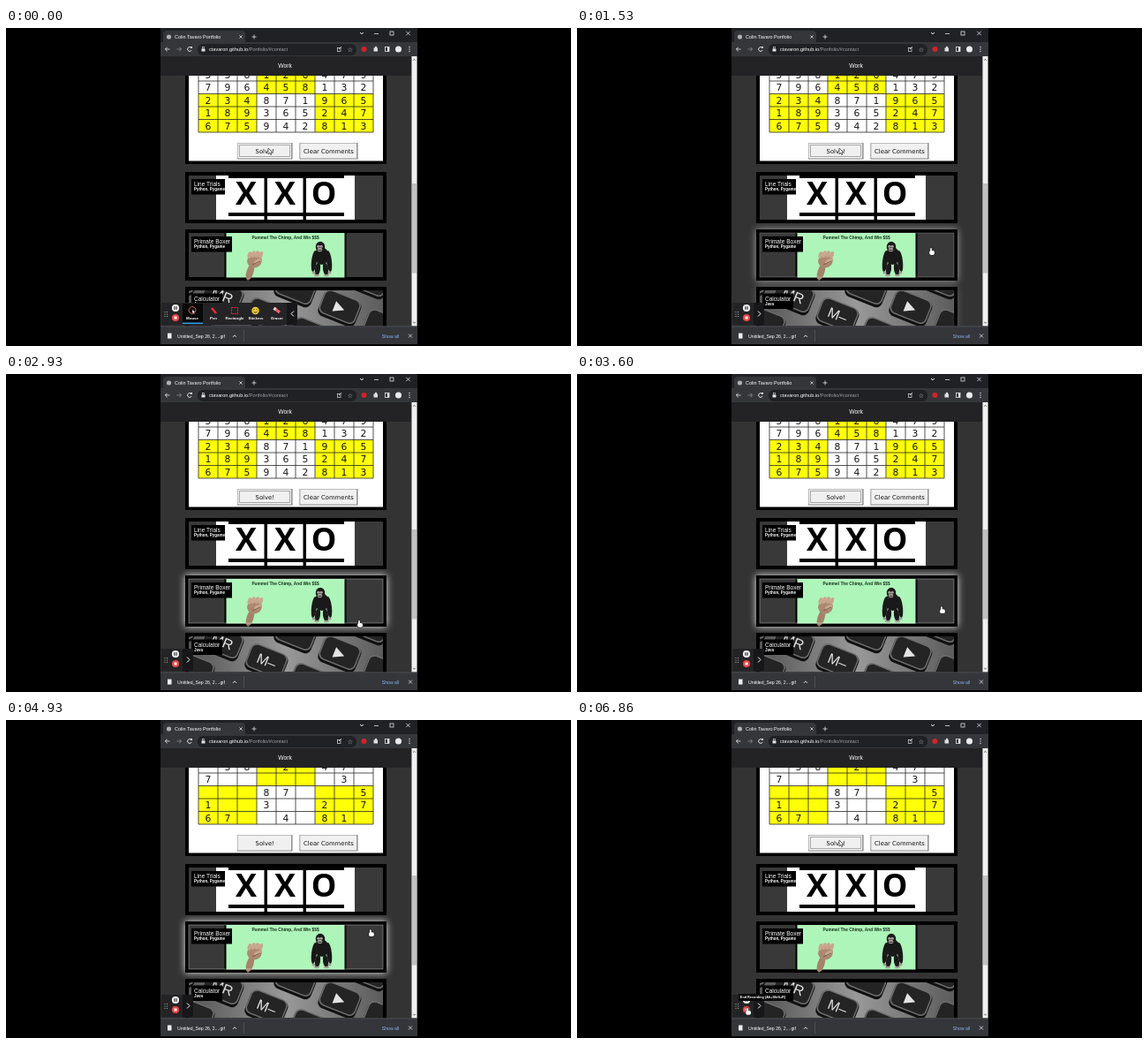
Animation, 640 px wide and 360 px high, one loop 7060 ms. Source, as an HTML page with a canvas:

```html
<!DOCTYPE html>
<html lang="en">
<head>
<meta charset="utf-8">
<style>
html, body { margin: 0; width: 100%; height: 100%; overflow: hidden; background: #000; }
canvas { display: block; width: 640px; height: 360px; }
</style>
</head>
<body>
<canvas id="stage" width="640" height="360"></canvas>
<script>
const ctx = document.getElementById('stage').getContext('2d');
const LOOP = 7060, TICK = 1000 / 15;
const FOLD = 1260, RESTART = 4900, PRESS = 6500;
const ARIAL = '"Liberation Sans", Arial, sans-serif';
const WIDE = '"DejaVu Sans", sans-serif';

// Stops of the pointer; motion between them is eased.
const STOPS = [
  { t: 0, x: 446, y: 366 }, { t: 860, x: 333, y: 321 }, { t: FOLD, x: 325, y: 321 },
  { t: 1700, x: 437, y: 215 }, { t: 2200, x: 370, y: 123 }, { t: 2930, x: 400, y: 279 },
  { t: 4130, x: 422, y: 252 }, { t: 4660, x: 421, y: 249 }, { t: 5860, x: 359, y: 160 },
  { t: 6800, x: 193, y: 326 }
];
const SOLVED = ['538126479', '796458132', '234871965', '189365247', '675942813'];
const GIVEN = [' 38 2 47 ', '7      3 ', '   87   5', '1  3  2 7', '67  4 81 '];

const cardAt = (y, h) => ({ x: 203, y, w: 228, h });
const CARDS = [cardAt(40, 114), ...[0, 1, 2].map((i) => cardAt(163 + i * 65, 58))];

const progress = (t, from, to) => {
  const k = Math.max(0, Math.min(1, (t - from) / (to - from)));
  return k * k * (3 - 2 * k);
};
const mix = (a, b, k) => a + (b - a) * k;

function pointerAt(t) {
  const next = Math.max(1, STOPS.findIndex((s) => s.t > t));
  if (t >= STOPS.at(-1).t) return STOPS.at(-1);
  const a = STOPS[next - 1], b = STOPS[next], k = progress(t, a.t, b.t);
  return { x: mix(a.x, b.x, k), y: mix(a.y, b.y, k) };
}

function rect(x, y, w, h, color) {
  ctx.fillStyle = color;
  ctx.fillRect(x, y, w, h);
}

function round(x, y, w, h, r, color) {
  ctx.fillStyle = color;
  ctx.beginPath();
  ctx.roundRect(x, y, w, h, r);
  ctx.fill();
}

function frame(x, y, w, h, color, width = 1) {
  ctx.strokeStyle = color;
  ctx.lineWidth = width;
  ctx.strokeRect(x, y, w, h);
}

function oval(x, y, rx, ry, color, tilt = 0) {
  ctx.fillStyle = color;
  ctx.beginPath();
  ctx.ellipse(x, y, rx, ry, tilt, 0, 7);
  ctx.fill();
}

const dot = (x, y, r, color) => oval(x, y, r, r, color);

function ring(x, y, r, color, end = 7) {
  ctx.strokeStyle = color;
  ctx.lineWidth = 1;
  ctx.beginPath();
  ctx.arc(x, y, r, .4, end);
  ctx.stroke();
}

function line(x1, y1, x2, y2, color, width = .8) {
  ctx.strokeStyle = color;
  ctx.lineWidth = width;
  ctx.beginPath();
  ctx.moveTo(x1, y1);
  ctx.lineTo(x2, y2);
  ctx.stroke();
}

function text(str, x, y, size, { color = '#fff', align = 'left', family = ARIAL, weight = '' } = {}) {
  ctx.font = `${weight} ${size}px ${family}`;
  ctx.fillStyle = color;
  ctx.textAlign = align;
  ctx.fillText(str, x, y);
}

function within(x, y, w, h, draw) {
  ctx.save();
  ctx.beginPath();
  ctx.rect(x, y, w, h);
  ctx.clip();
  draw();
  ctx.restore();
}

function placed(x, y, angle, scale, draw) {
  ctx.save();
  ctx.translate(x, y);
  ctx.rotate(angle);
  ctx.scale(scale, scale);
  draw();
  ctx.restore();
}

function cross(x, y, r, color = '#e0e2e5') {
  line(x - r, y - r, x + r, y + r, color);
  line(x - r, y + r, x + r, y - r, color);
}

// A corner whose tip points right at angle 0.
function chevron(x, y, r, angle, color = '#e0e2e5') {
  placed(x, y, angle, 1, () => {
    line(-r / 2, -r, r / 2, 0, color, 1);
    line(-r / 2, r, r / 2, 0, color, 1);
  });
}

function arrow(x, y, scale) {
  placed(x, y, 0, scale, () => {
    const shape = new Path2D('M0 0V8L2 6.3L3.2 9L4.6 8.4L3.4 5.7H5.8Z');
    ctx.fillStyle = '#fff';
    ctx.fill(shape);
    ctx.strokeStyle = '#111';
    ctx.lineWidth = .7;
    ctx.stroke(shape);
  });
}

function hand(x, y) {
  for (const [grow, color] of [[.6, '#222'], [0, '#fff']]) {
    round(x - .8 - grow, y - grow, 1.7 + 2 * grow, 6 + 2 * grow, 1, color);
    round(x - 1.8 - grow, y + 3 - grow, 5.8 + 2 * grow, 4.8 + 2 * grow, 1.8, color);
  }
}

function browserTop() {
  const ink = '#dfe1e5';
  rect(175, 0, 291, 17, '#202124');
  round(178, 3, 93, 15, [4, 4, 0, 0], '#35363a');
  dot(184.5, 10, 2.6, '#aeb1b5');
  text('Colin Tavaro Portfolio', 191, 12, 5.5);
  cross(266, 10, 1.6);
  line(278.5, 10, 283.5, 10, ink);
  line(281, 7.5, 281, 12.5, ink);
  chevron(403, 6, 2, Math.PI / 2);
  line(417, 6.5, 422, 6.5, ink);
  frame(435, 4, 4, 4, ink, .8);
  cross(455.5, 6, 2.2);

  rect(175, 16, 291, 16, '#35363a');
  round(217, 18, 180, 13, 6, '#202124');
  [[183, Math.PI, ink], [196, 0, '#888b90']].forEach(([x, angle, color]) => {
    chevron(x + Math.cos(angle) * 1.5, 24, 2.2, angle, color);
    line(x - 2.5, 24, x + 2.5, 24, color);
  });
  ring(208, 24, 2.4, ink, 5.5);
  rect(209, 21, 2, 2, ink);
  rect(221.5, 23.5, 4, 3, ink);
  frame(222.5, 21.5, 2, 2, ink, .6);
  const host = 'ctavaron.github.io';
  text(host, 230, 26, 5.6);
  const hostWidth = ctx.measureText(host).width;
  text('/Portfolio/#contact', 230 + hostWidth, 26, 5.6, { color: '#9aa0a6' });
  frame(375.5, 22.5, 3.5, 4, ink, .7);
  line(377, 24, 380, 21, ink);
  text('☆', 390, 26.7, 7, { color: ink, align: 'center', family: WIDE });
  dot(405.5, 24, 3, '#d3222a');
  rect(416.5, 22.5, 4.5, 4, ink);
  dot(419, 22, 1.2, ink);
  frame(429.5, 21.5, 4.5, 5, ink, .8);
  rect(432, 21.5, 2, 5, ink);
  dot(444.5, 24, 3.5, '#ececec');
  for (let i = -1; i < 2; i++) dot(457, 24 + i * 2.5, .7, ink);

  rect(175, 32, 284, 22, '#232325');
  text('Work', 316, 45.3, 6.8, { align: 'center' });
}

function downloads() {
  rect(175, 338, 291, 20, '#35363a');
  rect(175, 337.5, 291, .8, '#505258');
  rect(183, 345.5, 4.5, 6, '#eceef0');
  text('Untitled_Sep 26, 2....gif', 194, 350.8, 5.2);
  chevron(259, 348.8, 2, -Math.PI / 2);
  rect(269, 342, .8, 13, '#55575c');
  text('Show all', 435.5, 350.5, 5.1, { color: '#8ab4f8', align: 'center' });
  cross(458, 348.5, 2);
}

function scrollbar() {
  rect(459.5, 32, 6, 305.5, '#f1f1f1');
  rect(460, 176, 5, 101.5, '#c1c1c1');
  chevron(462.5, 36, 1.3, -Math.PI / 2, '#555');
  chevron(462.5, 333.5, 1.3, Math.PI / 2, '#555');
}

function cardFrame({ x, y, w, h }, glow) {
  ctx.save();
  ctx.shadowColor = `rgba(255,255,255,${glow * .9})`;
  ctx.shadowBlur = 8;
  rect(x, y, w, h, '#000');
  ctx.restore();
  rect(x + 4, y + 4, w - 8, h - 8, '#393939');
}

function label(y, w, title, tech) {
  rect(210, y, w, 17.5, '#000');
  text(title, 213, y + 8.2, 6.5);
  text(tech, 213, y + 13.2, 4.5, { weight: 'bold' });
}

function button(x, w, caption, focus) {
  rect(x, 130, w, 18.5, '#777');
  rect(x, 130, w - 1, 17.5, '#bbb');
  rect(x + 1, 131, w - 2.5, 16.5, '#f0f0f0');
  if (focus) {
    ctx.setLineDash(focus === 'dotted' ? [1, 1] : []);
    frame(x + 2.5, 132.5, w - 5.5, 13, focus === 'dotted' ? '#444' : '#999', .8);
    ctx.setLineDash([]);
  }
  text(caption, x + w / 2, 141.6, 6.8, { color: '#111', align: 'center', family: WIDE });
}

function sudoku(t) {
  const solved = t < RESTART, cell = 22, row = 14.5, left = 218, top = 45.5;
  rect(207, 54, 220, 96.5, '#fff');
  (solved ? SOLVED : GIVEN).forEach((digits, r) => {
    for (let c = 0; c < 9; c++) {
      const x = left + c * cell, y = top + r * row, middle = c > 2 && c < 6;
      if (middle === r < 2) rect(x, y, cell, row, '#ffff08');
      text(digits[c], x + 11, y + 11, 10.8, { color: '#151515', align: 'center', family: WIDE });
    }
  });
  for (let c = 0; c < 10; c++) line(left + c * cell, 54, left + c * cell, 118, '#282828');
  for (let r = 1; r < 6; r++) line(left, top + r * row, left + 9 * cell, top + r * row, '#282828');
  button(262, 62.5, 'Solve!', t > PRESS || t < 200 ? 'dotted' : solved && 'solid');
  button(332.5, 66, 'Clear Comments');
  const away = solved ? progress(t, 2000, 2600) : 1 - progress(t, RESTART, 5400);
  within(207, 54, 220, 96, () => arrow(297 + away * 25, 136 + away * 24, .85));
}

function noughts() {
  rect(238, 167, 157, 50, '#fff');
  rect(252, 167, 131, 3, '#000');
  rect(252, 209, 131, 4, '#000');
  for (let i = 0; i < 3; i++) {
    if (i) rect(248.5 + i * 44, 167, 3.5, 50, '#000');
    text('XXO'[i], 272 + i * 44, 200.3, 36,
      { color: '#000', align: 'center', family: '"Open Sans", sans-serif', weight: 'bold' });
  }
  label(171, 38, 'Line Trials', 'Python, Pygame');
}

function fist() {
  oval(276.5, 276, 4, 10, '#a5826a', .3);
  oval(281.5, 263.5, 8.5, 8, '#ab8870', -.4);
  for (let i = 0; i < 4; i++) oval(276 + i * 4.2, 257 - Math.sin(i), 2.3, 4, '#c7a68d', .3);
  oval(285, 264, 4.5, 2.2, '#c7a68d', -.5);
  line(279, 268, 288, 264, '#6b4d3a');
}

function ape() {
  const fur = '#191919', skin = '#a49b96';
  oval(357.5, 258, 8, 10, fur);
  oval(356, 248, 5.2, 6.2, fur);
  for (const side of [-1, 1]) {
    oval(357.5 + side * 8.5, 264, 3, 12, fur, side * -.12);
    oval(357.5 + side * 4.5, 273, 3, 7.5, fur, side * -.15);
    oval(357.5 + side * 9, 277, 2, 1.5, skin);
    oval(357.5 + side * 5.5, 280, 3, 1.3, skin);
    oval(355.5 + side * 1.6, 247.2, 1.7, 1.5, skin);
  }
  oval(355.5, 251, 2.8, 2.2, skin);
  line(353.5, 251.5, 357.5, 251.5, fur);
}

function boxing() {
  rect(247.5, 232, 138, 51, '#000');
  rect(249.5, 232, 134, 50.5, '#aef5ba');
  text('Pummel The Chimp, And Win $$$', 316.5, 238.5, 4.8,
    { color: '#163319', align: 'center', weight: 'bold' });
  fist();
  ape();
  label(236, 46, 'Primate Boxer', 'Python, Pygame');
}

function calculator() {
  within(207, 297, 220, 40, () => {
    const shade = ctx.createLinearGradient(207, 0, 427, 0);
    shade.addColorStop(0, '#555');
    shade.addColorStop(.5, '#999');
    shade.addColorStop(1, '#5c5c5c');
    rect(207, 297, 220, 40, shade);
    const captions = { '-1,0': 'MR', '0,0': 'M–', '1,1': '▶' };
    for (let row = -2; row < 3; row++) {
      for (let col = -4; col < 5; col++) {
        placed(295 + col * 50 + row * 33, 325 + col * 22 - row * 31, .38, 1, () => {
          round(-22, -14, 45, 31, 7, '#111');
          round(-22, -15, 44, 29, 7, '#6d6d6d');
          round(-20.5, -13.5, 41, 26, 6, '#242425');
          text(captions[[col, row]] || '', 0, 5.5, 16, { color: '#e4e4e4', align: 'center' });
        });
      }
    }
  });
  label(300.5, 35, 'Calculator', 'Java');
}

function tools() {
  rect(200, 312, 23, 23, '#080808');
  rect(200, 333.5, 23, 1.5, '#2f9bea');
  ring(211, 319.5, 3.8, '#d96a2b');
  arrow(211, 318.5, .6);
  line(233, 317, 238, 323, '#ee2839', 2.6);
  ctx.setLineDash([2, 1]);
  frame(255.5, 316.5, 7, 7, '#ef2638', 1.1);
  ctx.setLineDash([]);
  dot(282.5, 320, 4.2, '#f4cf32');
  for (const side of [-1, 1]) dot(282.5 + side * 1.5, 318.8, .7, '#493b10');
  ring(282.5, 320, 2.2, '#493b10', 2.7);
  line(304, 317.5, 310, 322, '#ef5e6d', 3.4);
  line(303.5, 317.2, 305.5, 318.6, '#f6dcdc', 3.4);
  ['Mouse', 'Pen', 'Rectangle', 'Stickers', 'Eraser'].forEach((name, i) =>
    text(name, 211 + i * 24, 329.5, 4.4, { align: 'center', weight: 'bold' }));
}

function toolbar(t) {
  const right = mix(330, 212, progress(t, FOLD, FOLD + 130));
  rect(176, 311, right - 176, 25.5, '#242426');
  within(199, 311, Math.max(0, right - 211), 25, tools);
  for (let i = 0; i < 6; i++) dot(180 + i % 2 * 2.5, 321.5 + (i >> 1) * 2.5, .6, '#bbb');
  dot(192, 317, 4.1, '#f3f3f3');
  for (const x of [190.3, 192.5]) rect(x, 315.2, 1.2, 3.6, '#333');
  dot(192, 328, 4.1, '#e94545');
  rect(190.5, 326.5, 3, 3, '#fff');
  round(right - 12, 311, 12, 25.5, [0, 3, 3, 0], '#171719');
  chevron(right - 5.5, 323.5, 3, right > 270 ? Math.PI : 0, '#fff');
  if (t >= 6730) {
    rect(183, 310, 55, 8, '#09090a');
    text('End Recording (Alt+Shift+R)', 210.5, 315.4, 3.8, { align: 'center', weight: 'bold' });
  }
}

const inside = (p, { x, y, w, h }) => p.x > x && p.x < x + w && p.y > y && p.y < y + h;

function isOver(card, t) {
  const p = pointerAt(t), barEdge = t < FOLD ? 330 : 212;
  return p.y < 337 && !(p.y > 311 && p.x < barEdge) && inside(p, card);
}

// Averaging recent hover states gives the glow a short fade.
function glowOf(card, t) {
  let sum = 0;
  for (let i = 0; i < 8; i++) sum += isOver(card, Math.max(0, t - i * 25));
  return sum / 8;
}

function render(t) {
  rect(0, 0, 640, 360, '#000');
  rect(175, 0, 291, 358, '#333');
  within(175, 54, 284.5, 283.5, () => {
    const glows = CARDS.map((card) => glowOf(card, t));
    CARDS.forEach((card, i) => cardFrame(card, glows[i]));
    sudoku(t);
    noughts();
    boxing();
    calculator();
    CARDS.forEach(({ x, y, w, h }, i) =>
      frame(x + 4, y + 4, w - 8, h - 8, `rgba(255,255,255,${glows[i] * .35})`));
  });
  scrollbar();
  browserTop();
  downloads();
  toolbar(t);
  const p = pointerAt(t);
  const clickable = inside(p, { x: 176, y: 54, w: 259, h: 283 });
  if (clickable) hand(p.x, p.y);
  else arrow(p.x, p.y, 1);
}

function tick() {
  const t = performance.now() % LOOP;
  render(Math.min(6867, Math.floor((t + 7) / TICK) * TICK));
  requestAnimationFrame(tick);
}
tick();
</script>
</body>
</html>
```
